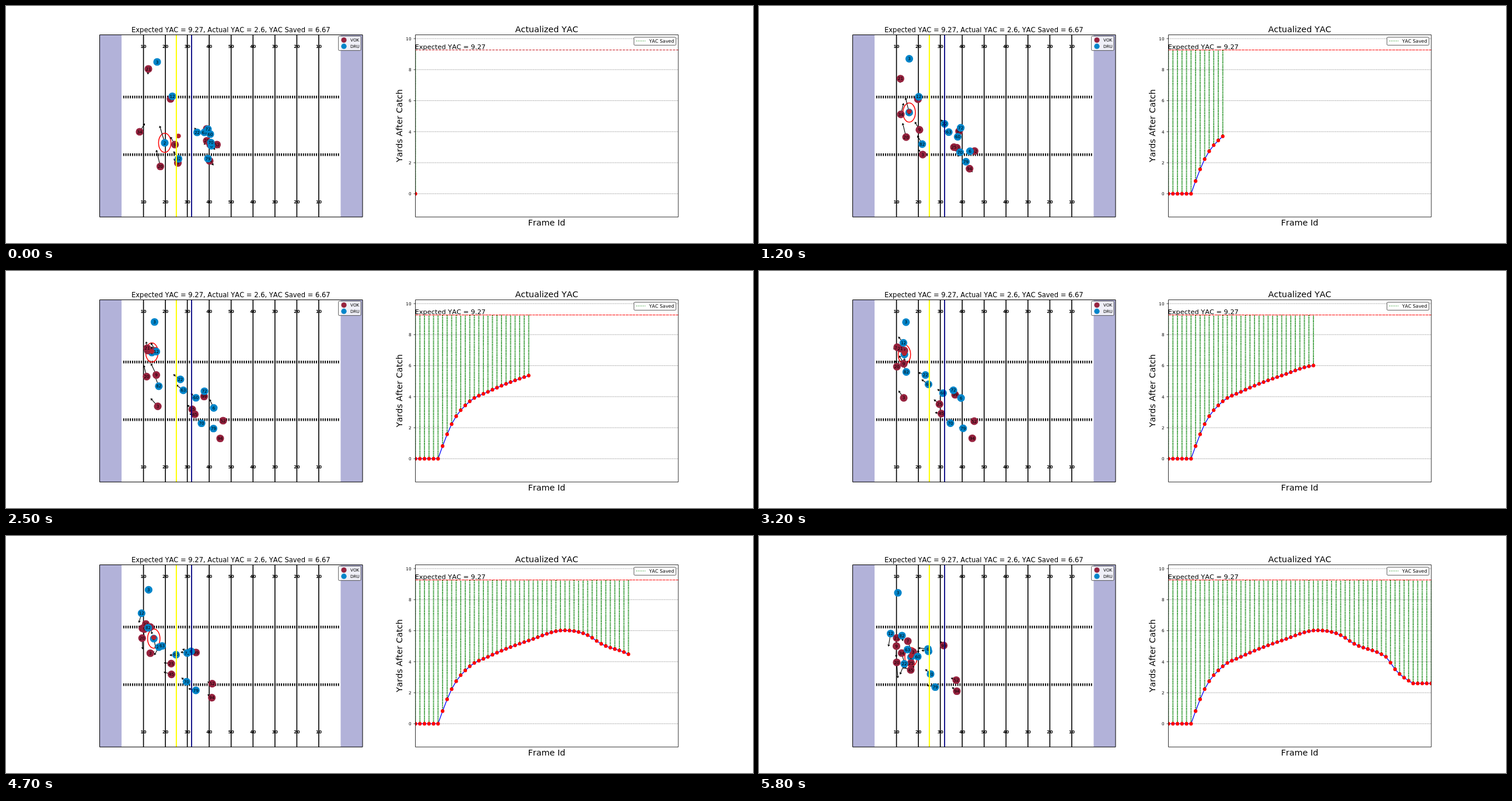
An HTML page with a canvas that plays this animation: 1280 by 407 pixels, repeating every 5900 ms.

```html
<!DOCTYPE html>
<html lang="en">
<head>
<meta charset="utf-8">
<title>Yards after catch</title>
<style>
  html, body { margin: 0; width: 100%; height: 100%; overflow: hidden; background: #fff; }
  canvas { display: block; width: 1280px; height: 407px; }
</style>
</head>
<body>
<canvas id="stage" width="1280" height="407"></canvas>
<script>
const ctx = document.getElementById('stage').getContext('2d');
const STEP = 100, STEPS = 59, CATCH = 5;
const HOME = '#97233f', AWAY = '#0085ca';
const FIELD = { x: 160.5, y: 49.5, w: 450.5, h: 312.8 };
const PLOT = { x: 701.5, y: 49.5, w: 450.5, h: 312.8 };
const YARD = FIELD.w / 120;
const EXPECTED = 9.27;
const BALL_START = { x: 295.3, y: 223.2 };

// Smooth curve through a few points, giving value and speed; flat outside them.
function spline(times, values) {
  const last = times.length - 1;
  const gap = times.slice(1).map((t, i) => t - times[i]);
  const slope = gap.map((h, i) => (values[i + 1] - values[i]) / h);
  const m = times.map((_, i) => i && i < last
    ? (slope[i - 1] * gap[i] + slope[i] * gap[i - 1]) / (gap[i - 1] + gap[i]) : 0);
  m[0] = 1.5 * slope[0] - 0.5 * m[1];
  m[last] = 1.5 * slope[last - 1] - 0.5 * m[last - 1];
  return n => {
    const t = Math.min(times[last], Math.max(times[0], n));
    let i = 0;
    while (i < last - 1 && t >= times[i + 1]) i++;
    const u = (t - times[i]) / gap[i];
    const b = 3 * slope[i] - 2 * m[i] - m[i + 1];
    const c = m[i] + m[i + 1] - 2 * slope[i];
    return {
      at: values[i] + gap[i] * u * (m[i] + u * (b + u * c)),
      speed: m[i] + u * (2 * b + 3 * u * c)
    };
  };
}

// Steady runners need few waypoints, those who turn sharply need more.
const WAYPOINT_STEPS = { 3: [0, 25, 58], 4: [0, 16, 39, 58], 5: [0, 16, 25, 39, 58] };

function player(color, number, ...points) {
  const steps = WAYPOINT_STEPS[points.length];
  const [x, y] = [0, 1].map(axis => spline(steps, points.map(p => p[axis])));
  return n => {
    const px = x(n), py = y(n);
    return { color, number, x: px.at, y: py.at, vx: px.speed, vy: py.speed };
  };
}

const carrier = player(AWAY, 2, [272, 235], [254, 168], [250, 140], [250, 158], [260.5, 208]);

// From back to front.
const players = [
  carrier,
  player(HOME, 7, [282, 159.5], [268, 156], [255.5, 137], [246, 144], [255, 180.5]),
  player(HOME, 99, [344, 211], [339.5, 215.5], [316.5, 188]),
  player(HOME, 45, [350, 238], [323.5, 246], [260, 230]),
  player(HOME, 34, [229, 216], [245, 173], [243, 136.5], [231.5, 139], [244.5, 201]),
  player(HOME, 21, [244, 108], [242, 129], [241.5, 138], [236, 175]),
  player(HOME, 9, [289.5, 238], [270, 204], [241, 151], [235.5, 189]),
  player(HOME, 20, [264.5, 275.5], [248.5, 211], [233.5, 160], [236, 217]),
  player(HOME, 3, [294.5, 269.5], [275.5, 249.5], [242.5, 207], [264, 199]),
  player(HOME, 52, [361.5, 238], [372, 257], [338, 247.5]),
  player(HOME, 94, [349, 266], [367, 287.5], [339, 266.5]),
  player(HOME, 25, [344, 231.5], [330, 243.5], [298, 222], [260.5, 218]),
  player(AWAY, 22, [327.5, 217], [313.5, 198], [273, 178.5], [249, 219.5]),
  player(AWAY, 63, [340, 217], [319.5, 215], [278.5, 188.5], [254.5, 195]),
  player(AWAY, 60, [350, 220], [336.5, 224.5], [304.5, 204.5], [272, 207]),
  player(AWAY, 72, [346, 211.5], [340, 206.5], [290.5, 198]),
  player(AWAY, 6, [352, 240], [362, 249], [334, 205], [289.5, 194]),
  player(AWAY, 70, [351, 234.5], [335, 261.5], [294, 237]),
  player(AWAY, 12, [285, 155], [269.5, 154], [239, 119], [225.5, 167.5]),
  player(AWAY, 82, [295.5, 262.5], [274.5, 227.5], [246, 158.5], [245, 171]),
  player(AWAY, 79, [346, 262], [355.5, 270.5], [302, 259.5]),
  player(AWAY, 3, [259, 96], [254.5, 87.5], [238, 97.5])
];

const yards = spline(
  [CATCH, 8, 12, 16, 25, 33, 38, 41, 47, 48, 50, 54],
  [0, 2.23, 3.7, 4.31, 5.36, 6.02, 5.71, 5.15, 4.48, 4.31, 3.51, 2.6]
);

const plotX = n => PLOT.x + n * PLOT.w / (STEPS - 1);
const plotY = v => 322.4 - 26.64 * v;

function text(s, x, y, size, align = 'center', weight = '') {
  ctx.font = `${weight} ${size}px "DejaVu Sans", sans-serif`;
  ctx.textAlign = align;
  ctx.fillStyle = '#000';
  ctx.fillText(s, x, y);
}

function line(x1, y1, x2, y2, color, width, dash = []) {
  ctx.strokeStyle = color;
  ctx.lineWidth = width;
  ctx.setLineDash(dash);
  ctx.beginPath();
  ctx.moveTo(x1, y1);
  ctx.lineTo(x2, y2);
  ctx.stroke();
  ctx.setLineDash([]);
}

function oval(x, y, rx, ry, color) {
  ctx.fillStyle = color;
  ctx.beginPath();
  ctx.ellipse(x, y, rx, ry, 0, 0, 2 * Math.PI);
  ctx.fill();
}

function frame({ x, y, w, h }, width) {
  ctx.strokeStyle = '#000';
  ctx.lineWidth = width;
  ctx.strokeRect(x, y, w, h);
}

function legendBox(x, y, w, h) {
  ctx.beginPath();
  ctx.roundRect(x, y, w, h, 1.5);
  ctx.fillStyle = 'rgba(255,255,255,.8)';
  ctx.fill();
  ctx.strokeStyle = '#333';
  ctx.lineWidth = 0.8;
  ctx.stroke();
}

// Points where the player is heading, longer when faster.
function arrow({ x, y, vx, vy }) {
  const reach = 6.5, head = 3.6, length = Math.hypot(vx, vy) * reach;
  ctx.save();
  ctx.translate(x, y);
  ctx.rotate(Math.atan2(vy, vx));
  line(0, 0, Math.max(0, length - head), 0, '#000', 1.1);
  ctx.fillStyle = '#000';
  ctx.beginPath();
  ctx.moveTo(length, 0);
  ctx.lineTo(length - head, -2.2);
  ctx.lineTo(length - head, 2.2);
  ctx.fill();
  ctx.restore();
}

function drawField() {
  const { x, y, w, h } = FIELD;
  ctx.fillStyle = 'rgb(178,178,217)';
  ctx.fillRect(x, y, 10 * YARD, h);
  ctx.fillRect(x + 110 * YARD, y, 10 * YARD, h);
  for (let k = 10; k <= 90; k += 10) {
    const lx = x + (10 + k) * YARD;
    line(lx, y, lx, y + h, '#000', 1.6);
  }
  ctx.fillStyle = '#000';
  for (let k = 1; k <= 99; k++) {
    const hx = x + (10 + k) * YARD - 0.9;
    ctx.fillRect(hx, 154, 1.8, 4.6);
    ctx.fillRect(hx, 253, 1.8, 4.6);
  }
  for (let k = 10; k <= 90; k += 10) {
    const lx = x + (10 + k) * YARD, label = 50 - Math.abs(50 - k);
    text(label, lx, 72.3, 7.2, 'center', 'bold');
    text(label, lx, 339.2, 7.2, 'center', 'bold');
  }
}

function drawBall(n) {
  const held = carrier(Math.max(n, CATCH)), u = Math.min(1, n / CATCH);
  const { x, y } = BALL_START;
  oval(x + (held.x - x) * u, y + (held.y - 2 - y) * u, 4.4, 4, '#b22230');
}

function drawPlayers(n) {
  const poses = players.map(pose => pose(n));
  const { x, y } = carrier(n);
  ctx.strokeStyle = '#f00';
  ctx.lineWidth = 1.5;
  ctx.beginPath();
  ctx.ellipse(x, y, 10.6, 16.5, 0, 0, 2 * Math.PI);
  ctx.stroke();
  poses.forEach(arrow);
  for (const p of poses) {
    oval(p.x, p.y, 6.6, 6.6, p.color);
    text(p.number, p.x, p.y + 2.6, 7.2);
  }
  drawBall(n);
}

function drawLeft(n) {
  const bottom = FIELD.y + FIELD.h;
  drawField();
  drawPlayers(n);
  line(291.9, FIELD.y, 291.9, bottom, '#ff0', 2);
  line(318, FIELD.y, 318, bottom, '#000080', 1.8);
  frame(FIELD, 1);
  text('Expected YAC = 9.27, Actual YAC = 2.6, YAC Saved = 6.67', 385.3, 44.6, 11.52);
  legendBox(569.7, 51.8, 38.4, 24.6);
  oval(579, 58.5, 4.6, 4.6, HOME);
  oval(579, 69.2, 4.6, 4.6, AWAY);
  text('VOK', 590, 61.2, 7.2, 'left');
  text('DRU', 590, 72, 7.2, 'left');
}

function drawCurve(n) {
  const limit = plotY(EXPECTED);
  const points = Array.from({ length: n + 1 }, (_, i) => [plotX(i), plotY(yards(i).at)]);
  ctx.save();
  ctx.beginPath();
  ctx.rect(PLOT.x, PLOT.y, PLOT.w, PLOT.h);
  ctx.clip();
  for (const [x, y] of points) line(x, y, x, limit, '#008000', 1.9, [1.7, 1.16]);
  // Redrawn once per step, so the dashes grow heavier.
  for (let i = 0; i <= Math.min(n, 7); i++)
    line(PLOT.x, limit, PLOT.x + PLOT.w, limit, n ? '#f00' : '#c8141e', 1.1, [4, 1.73]);
  ctx.strokeStyle = '#00f';
  ctx.lineWidth = 1.3;
  ctx.beginPath();
  for (const p of points) ctx.lineTo(...p);
  ctx.stroke();
  for (const [x, y] of points) oval(x, y, 3.1, 3.1, '#f00');
  ctx.restore();
}

function drawRight(n) {
  for (let v = 0; v <= 10; v += 2) {
    const y = plotY(v);
    line(PLOT.x, y, PLOT.x + PLOT.w, y, '#777', 0.6, [1.9, 0.9]);
    line(PLOT.x - 3, y, PLOT.x, y, '#000', 0.7);
    text(v, 694.5, y + 2.7, 7.2, 'right');
  }
  drawCurve(n);
  frame(PLOT, 0.8);
  text('Expected YAC = 9.27', 700.7, 74.2, 11.35, 'left');
  text('Actualized YAC', 926.5, 44.6, 14.4);
  text('Frame Id', 926.5, 376.9, 14.4);
  ctx.save();
  ctx.translate(678.7, 205.5);
  ctx.rotate(-Math.PI / 2);
  text('Yards After Catch', 0, 0, 14.3);
  ctx.restore();
  legendBox(1076, 53.5, 72, 13.8);
  line(1080, 60, 1095.5, 60, '#008000', 1.2, [1.2, 1.7]);
  text('YAC Saved', 1102, 62.9, 7.92, 'left');
}

function draw(now) {
  const n = Math.floor(now / STEP) % STEPS;
  ctx.fillStyle = '#fff';
  ctx.fillRect(0, 0, 1280, 407);
  drawLeft(n);
  drawRight(n);
}

ctx.fontKerning = 'none';
ctx.lineJoin = 'round';
let start;
function tick(now) {
  start ??= now;
  draw(now - start);
  requestAnimationFrame(tick);
}
draw(0);
requestAnimationFrame(tick);
</script>
</body>
</html>
```
